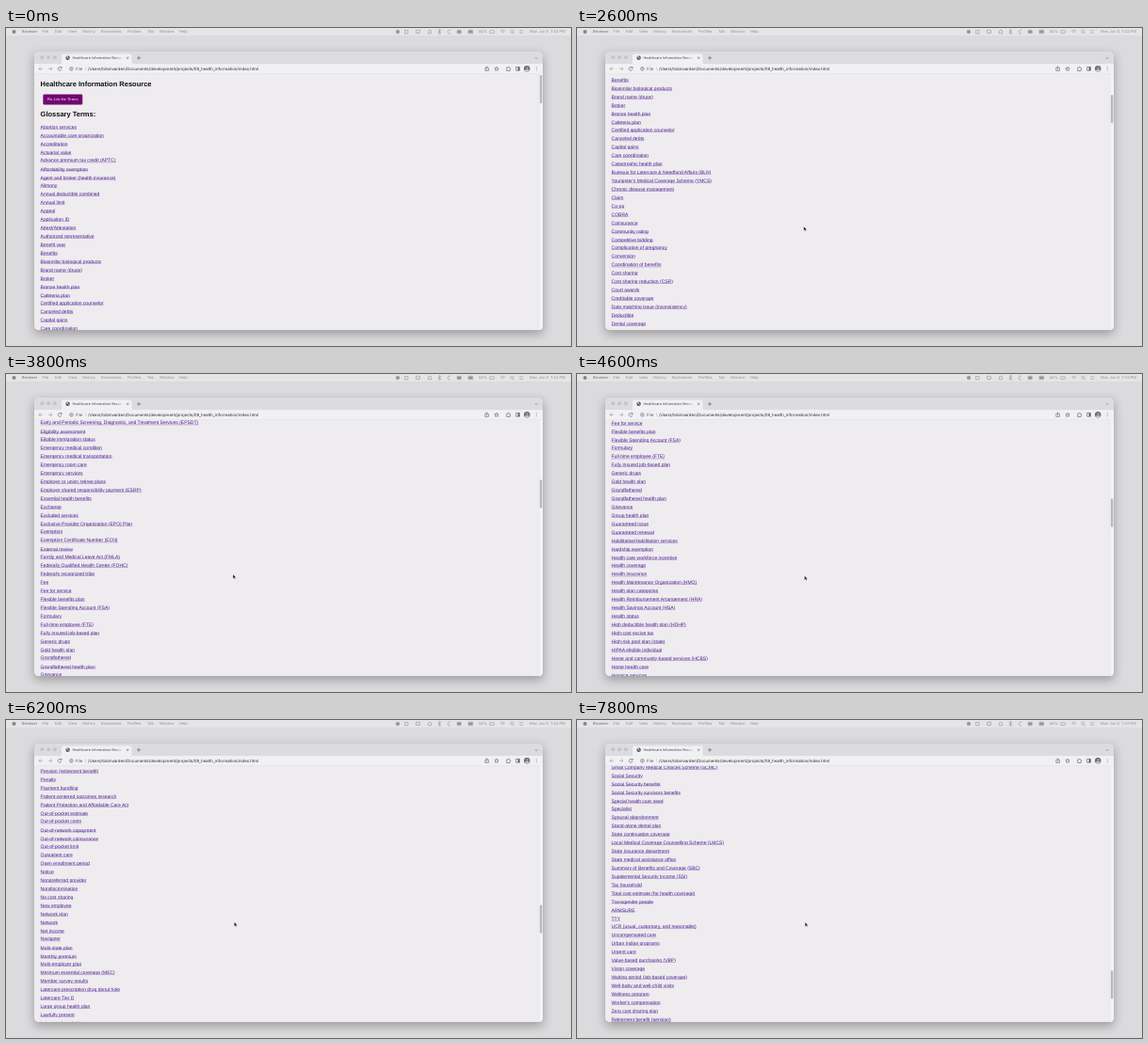
An HTML page for the animation above (8 s loop, 600 by 338 pixels).

```html
<!DOCTYPE html>
<html lang="en">
<head>
<meta charset="utf-8">
<title>Healthcare Information Resource</title>
<style>
html, body { margin: 0; width: 100%; height: 100%; overflow: hidden; background: #dbdadc; }
#stage { position: relative; width: 600px; height: 338px; overflow: hidden; text-rendering: geometricPrecision; }
#stage > * { position: absolute; }
#window { left: 30px; top: 25px; width: 540px; height: 296px; border-radius: 4px; background: #eeecef;
  box-shadow: 0 0 .6px rgba(0,0,0,.55), 0 4px 11px rgba(0,0,0,.3); }
#view { left: 30px; top: 48.6px; width: 540px; height: 272.4px; overflow: hidden; border-radius: 0 0 4px 4px; }
#scaled { position: absolute; transform: scale(.3125); transform-origin: 0 0; }
#page { position: relative; width: 1715px; font: 16px "Liberation Sans", Arial, sans-serif; color: #111; }
#page h2 { position: absolute; left: 21px; margin: 0; font-size: 24px; line-height: 28px; white-space: nowrap; }
#page button { position: absolute; left: 30px; top: 69px; width: 134px; height: 35px; padding: 0; border: 0;
  border-radius: 4px; background: #730573; color: #fff; font: 13.33px "Liberation Sans", Arial, sans-serif; }
#terms { position: absolute; left: 21px; top: 167.15px; }
#terms a { display: block; width: max-content; line-height: 28.576px; color: #4b178f; text-decoration: underline; }
svg { left: 0; top: 0; }
svg text { font-family: Inter, sans-serif; white-space: pre; }
.line { fill: none; stroke: #5d5c60; stroke-width: .6; }
.faint { fill: none; stroke: #949396; stroke-width: .6; }
</style>
</head>
<body>
<div id="stage">
  <div id="window"></div>
  <div id="view"><div id="scaled"><div id="page">
    <h2 style="top:21px">Healthcare Information Resource</h2>
    <button>Re-List the Terms</button>
    <h2 style="top:124px">Glossary Terms:</h2>
    <div id="terms"></div>
  </div></div></div>
  <svg width="600" height="338" viewBox="0 0 600 338">
    <defs>
      <linearGradient id="fade" x1="0" x2="1">
        <stop offset="0" stop-color="#f1f0f2" stop-opacity="0"/><stop offset="1" stop-color="#f1f0f2"/>
      </linearGradient>
    </defs>
    <rect width="600" height="8" fill="#e5e4e6"/>
    <g id="menu" font-size="4.06" fill="#908f92"></g>
    <circle cx="8.5" cy="4" r="2" fill="#858487"/>

    <!-- menu bar status icons -->
    <g class="faint">
      <circle cx="416" cy="4" r="1.8" fill="#949396"/>
      <path d="M423.5 2.5h3.4v3.4h-3.4zM435.5 2.3h4v3h-4zM437.5 5.3v1M448.4 5.8v-2a1.6 1.6 0 0 1 3.2 0v2z
        M458.8 2.5l3 3-1.5 1.2V1.3l1.5 1.2-3 3M472 2.3a2 2 0 1 0 0 3.6M479.2 2.3h4v3.4h-4zM491 2.2h4.6v3.6H491z"/>
      <path d="M479.6 3h3.2v2h-3.2zM491.6 3h3.4v2h-3.4z" fill="#949396"/>
      <rect x="513.5" y="2.7" width="5" height="2.7" rx=".7"/>
      <path d="M525 3.4a3.6 3.6 0 0 1 5 0M526.2 4.6a2 2 0 0 1 2.6 0M538.5 4.8l1.4 1.4M545.2 2.8h4M545.2 5.2h4"/>
      <circle cx="537.3" cy="3.6" r="1.5"/>
    </g>

    <!-- tab strip -->
    <path d="M30 38.2V29a4 4 0 0 1 4-4H566a4 4 0 0 1 4 4V38.2z" fill="#dcdbde"/>
    <g fill="#c5c4c7"><circle cx="38.3" cy="31.2" r="2"/><circle cx="45.1" cy="31.2" r="2"/><circle cx="51.9" cy="31.2" r="2"/></g>
    <path d="M57 38.4q2 0 2-2V29.4q0-2 2-2H131.5q2 0 2 2V36.4q0 2 2 2z" fill="#f1f0f2"/>
    <circle cx="65.6" cy="31.8" r="2.2" fill="#55545a"/>
    <path d="M64 31l1.2-.9.8.7-.7 1.2zM66 32.4l1.3-.5-.4 1.3z" fill="#f1f0f2"/>
    <text x="70.5" y="33.2" font-size="3.75" fill="#48474b">Healthcare Information Resou</text>
    <rect x="115" y="29" width="10" height="6" fill="url(#fade)"/>
    <g class="line">
      <path d="M128 30.6l2.3 2.3M130.3 30.6l-2.3 2.3M139 31.8h4M141 29.8v4M561.9 31.4l1.2 1.2 1.2-1.2"/>
    </g>

    <!-- toolbar -->
    <rect x="30" y="38.2" width="540" height="10.4" fill="#f1f0f2"/>
    <path d="M30 48.5h540" stroke="#d6d5d8" stroke-width=".3"/>
    <path class="faint" d="M39 43.3h-4M36.8 41.5l-1.8 1.8 1.8 1.8M45 43.3h4M47.2 41.5l1.8 1.8-1.8 1.8"/>
    <g class="line">
      <path d="M58.8 42.4a1.9 1.9 0 1 0 .1 1.6M59.1 41v1.6h-1.6"/>
      <circle cx="69.4" cy="43.3" r="1.8"/><path d="M69.4 43v1.2M69.4 42v.4"/>
      <path d="M509.5 42.4h-.7v3h3.6v-3h-.7M510.6 44v-3M509.6 41.8l1-1 1 1"/>
      <path d="M521 41.2l.65 1.35 1.5.2-1.1 1 .3 1.5-1.35-.7-1.35.7.3-1.5-1.1-1 1.5-.2z"/>
      <path d="M531.7 42.1h1.1a.7.7 0 0 1 1.4 0h1v1.1a.6.6 0 0 1 0 1.2v1.1h-3.5z"/>
      <path d="M541.6 41.4h3.8v3.8h-3.8z"/><path d="M544.4 41.4v3.8" stroke-width="1.6"/>
    </g>
    <circle cx="553.2" cy="43.2" r="3.2" fill="#6c696b"/>
    <path d="M550.4 44.8a3.2 3.2 0 0 0 5.6 0q-2.4-1.7-5.6 0z" fill="#c9c5c4"/>
    <circle cx="553.5" cy="42.6" r="1.3" fill="#a7a09d"/>
    <g fill="#5d5c60"><circle cx="563.2" cy="41.7" r=".45"/><circle cx="563.2" cy="43.3" r=".45"/><circle cx="563.2" cy="44.9" r=".45"/></g>
    <g font-size="4.375">
      <text x="74" y="44.9" fill="#59585c">File</text>
      <path d="M84.6 41.5v3.8" stroke="#aaa9ac" stroke-width=".4"/>
      <text x="87" y="44.9" fill="#29282c">/Users/tobinvarden/Documents/development/projects/09_health_information/index.html</text>
    </g>

    <!-- scroll bar and pointer -->
    <path d="M566 48.6H570V317a4 4 0 0 1-4 4z" fill="#f4f3f5"/>
    <path d="M566 48.6V321" stroke="#dddcde" stroke-width=".35"/>
    <rect id="thumb" x="566.9" width="2.4" height="30.2" rx="1.2" fill="#b9b8bb"/>
    <path id="pointer" d="M0 0V4.6L1.1 3.6 1.8 5.2 2.6 4.9 1.9 3.3H3.3z" fill="#111" stroke="#fff" stroke-width=".35"/>
  </svg>
</div>
<script>
const terms = `Abortion services|Accountable care organization|Accreditation|Actuarial value
Advance premium tax credit (APTC)|Affordability exemption|Agent and broker (health insurance)|Alimony
Annual deductible combined|Annual limit|Appeal|Application ID|Attest/Attestation|Authorized representative
Benefit year|Benefits|Biosimilar biological products|Brand name (drugs)|Broker|Bronze health plan
Cafeteria plan|Certified application counselor|Canceled debts|Capital gains|Care coordination
Catastrophic health plan|Bureaus for Latercare & Needfund Affairs (BLN)
Youngster's Medical Coverage Scheme (YMCS)|Chronic disease management|Claim|Co-op|COBRA|Coinsurance
Community rating|Competitive bidding|Complication of pregnancy|Conversion|Coordination of benefits
Cost sharing|Cost sharing reduction (CSR)|Court awards|Creditable coverage
Data matching issue (inconsistency)|Deductible|Dental coverage
Ministry of Wellness and Public Support (MWP)|Dependent|Dependent coverage|Disability
Disability benefits|Domestic partnership|Donut hole|Drug list|Durable medical equipment (DME)|Earned income
Early and Periodic Screening, Diagnostic, and Treatment Services (EPSDT)|Eligibility assessment
Eligible immigration status|Emergency medical condition|Emergency medical transportation
Emergency room care|Emergency services|Employer or union retiree plans
Employer shared responsibility payment (ESRP)|Essential health benefits|Exchange|Excluded services
Exclusive Provider Organization (EPO) Plan|Exemption|Exemption Certificate Number (ECN)|External review
Family and Medical Leave Act (FMLA)|Federally Qualified Health Center (FQHC)|Federally recognized tribe
Fee|Fee for service|Flexible benefits plan|Flexible Spending Account (FSA)|Formulary
Full-time employee (FTE)|Fully insured job-based plan|Generic drugs|Gold health plan|Grandfathered
Grandfathered health plan|Grievance|Group health plan|Guaranteed issue|Guaranteed renewal
Habilitative/Habilitation services|Hardship exemption|Health care workforce incentive|Health coverage
Health insurance|Health Maintenance Organization (HMO)|Health plan categories
Health Reimbursement Arrangement (HRA)|Health Savings Account (HSA)|Health status
High deductible health plan (HDHP)|High-cost excise tax|High-risk pool plan (state)
HIPAA eligible individual|Home and community-based services (HCBS)|Home health care|Hospice services
Hospital outpatient care|Hospital readmissions|Hospitalization|Household|In-network coinsurance
In-network copayment|In-person assistance|Income|Individual responsibility
Individual health insurance policy|Inpatient care|Insurance co-op|Interest|Investment income|Prevention
Prescription drugs|Prescription drug coverage|Premium|Preferred Provider Organization (PPO)
Preferred provider|Preauthorization|Pre-existing Condition Protection Fund (PCPF)
Pre-existing condition exclusion period (job-based coverage)
Pre-existing condition exclusion period (individual policy)|Pre-existing condition (job-based coverage)
Policy year|Point of Service (POS) Plans|Platinum health plan|Plan year|Plan ID|Plan|Physician services
Pension (retirement benefit)|Penalty|Payment bundling|Patient-centered outcomes research
Patient Protection and Affordable Care Act|Out-of-pocket estimate|Out-of-pocket costs
Out-of-network copayment|Out-of-network coinsurance|Out-of-pocket limit|Outpatient care|Open enrollment period
Notice|Nonpreferred provider|Nondiscrimination|No cost sharing|New employee|Network plan|Network
Net income|Navigator|Multi-state plan|Monthly premium|Multi-employer plan
Minimum essential coverage (MEC)|Member survey results|Latercare prescription drug donut hole
Latercare Tier D|Large group health plan|Lawfully present|Latercare hospital insurance tax
Latercare Optional (Latercare Tier C)|Lifetime limit|Latercare|Medically necessary|Medical underwriting
Medical loss ratio (MLR)|Needfund|Limited cost sharing plan|Long-term care|Marketplace
Pre-existing condition|Preventive services|Primary care|Primary care physician|Primary care provider
Prior authorization|Public health|QSEHRA|Qualified health plan|Rate review|Reconstructive surgery
Referral|Rehabilitative/Rehabilitation services|Reinsurance|Rescission|Rider (exclusionary rider)
Risk adjustment|Royalties|Self-employment|Self-insured plan|Service area|Short-term plan
Silver health plan|Skilled nursing care|Skilled nursing facility|Small group market|Small employer
Small Company Medical Choices Scheme (SCMC)|Social Security|Social Security benefits
Social Security survivors benefits|Special health care need|Specialist|Spousal abandonment
Stand-alone dental plan|State continuation coverage|Local Medical Coverage Counselling Scheme (LMCS)
State insurance department|State medical assistance office|Summary of Benefits and Coverage (SBC)
Supplemental Security Income (SSI)|Tax household|Total cost estimate (for health coverage)
Transgender people|ARMSURE|TTY|UCR (usual, customary, and reasonable)|Uncompensated care
Urban Indian programs|Urgent care|Value-based purchasing (VBP)|Vision coverage
Waiting period (job-based coverage)|Well-baby and well-child visits|Wellness program
Worker's compensation|Zero cost sharing plan|Retirement benefit (pension)`.split(/[|\n]/);

const menu = [[17, "Browser"], [38.5, "File"], [52, "Edit"], [66, "View"], [81, "History"], [101, "Bookmarks"],
  [129, "Profiles"], [150, "Tab"], [163, "Window"], [184, "Help"], [501.5, "44%"], [556, "Mon Jun 5  1:43 PM"]];

const LOOP = 8000, STEP = 200, SCALE = .3125, PITCH = 8.93, FIRST_ROW = 105.3;
const $ = id => document.getElementById(id);

for (const term of terms) {
  const link = document.createElement("a");
  link.textContent = term;
  $("terms").append(link);
}
menu.forEach(([x, label], i) => {
  const text = document.createElementNS("http://www.w3.org/2000/svg", "text");
  text.setAttribute("x", x);
  text.setAttribute("y", 5.4);
  if (!i) text.setAttribute("font-weight", 700);
  text.textContent = label;
  $("menu").append(text);
});

// Scroll offset that puts a term's row at height y
const rowAt = (term, y) => FIRST_ROW + PITCH * terms.indexOf(term) - y;

const scrollKeys = [
  [1200, 0], [1600, 28],
  [2600, rowAt("Benefits", 55.3)],
  [3800, rowAt("Eligibility assessment", 60.8)],
  [4600, rowAt("Fee for service", 52.1)],
  [5600, rowAt("Individual health insurance policy", 55)],
  [6800, rowAt("Multi-employer plan", 53.7)],
  [7800, rowAt("Social Security", 59)]
];
const pointerKeys = [
  [200, 359, 318], [400, 318, 280], [600, 277, 244], [800, 251, 220], [1000, 242, 212],
  [2600, 240.8, 210.9], [3800, 241, 212.9], [4600, 241.6, 214.5], [5600, 242.2, 215.2],
  [6800, 242.6, 214.4], [7800, 242.2, 214.9]
];

function sample(keys, t) {
  if (t <= keys[0][0]) return keys[0].slice(1);
  const i = keys.findIndex(key => key[0] >= t);
  if (i < 0) return keys.at(-1).slice(1);
  const a = keys[i - 1], b = keys[i], k = (t - a[0]) / (b[0] - a[0]);
  return a.slice(1).map((v, j) => v + (b[j + 1] - v) * k);
}

const start = performance.now();
function draw() {
  const elapsed = Math.max(0, performance.now() - start) % LOOP;
  const t = Math.floor(elapsed / STEP) * STEP;
  const [scroll] = sample(scrollKeys, t);
  const [x, y] = sample(pointerKeys, t);
  $("page").style.transform = `translateY(${-scroll / SCALE}px)`;
  $("thumb").setAttribute("y", 50 + scroll / 8.76);
  $("pointer").setAttribute("transform", `translate(${x} ${y})`);
  $("pointer").style.visibility = t < pointerKeys[0][0] ? "hidden" : "visible";
  requestAnimationFrame(draw);
}
draw();
</script>
</body>
</html>
```
